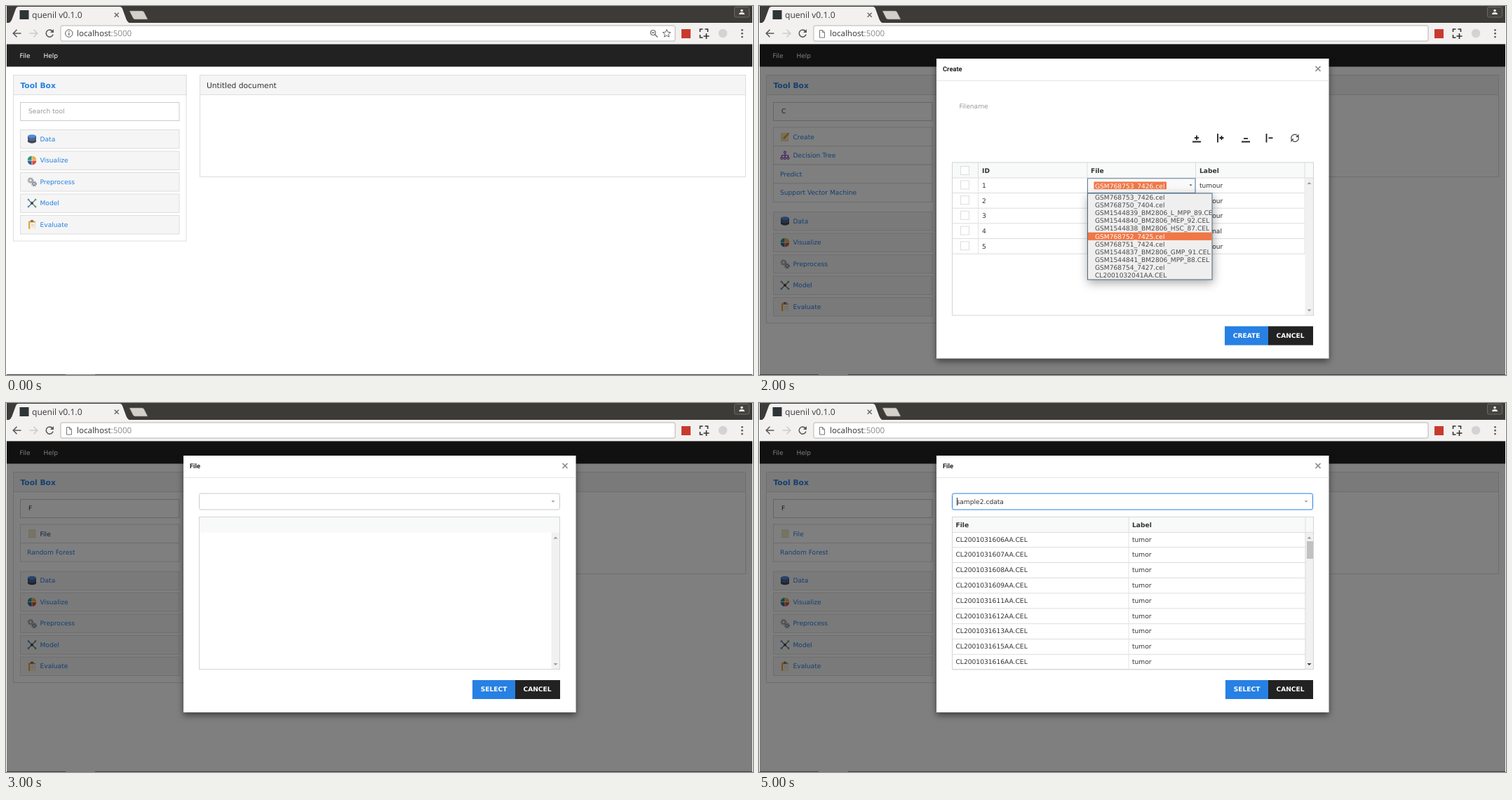
Write an HTML page that moves like this. It is 1065 px wide and 526 px high and loops after 6 s.

```html
<!DOCTYPE html>
<html lang="en">
<head>
<meta charset="utf-8">
<title>Tool box demo</title>
<style>
  html, body { margin: 0; width: 100%; height: 100%; overflow: hidden; background: #fff; }
  svg { display: block; width: 100%; height: 100%; }
  text { font-family: "DejaVu Sans", sans-serif; text-rendering: geometricPrecision; white-space: pre; }
  .chrome { font-family: "Open Sans", sans-serif; }
  .title { font-family: Roboto, sans-serif; }
  .modal { filter: drop-shadow(0 4px 5px rgba(0, 0, 0, .5)); }
  .menu { filter: drop-shadow(1px 4px 7px rgba(0, 0, 0, .35)); }
</style>
</head>
<body>
<svg id="stage" viewBox="0 0 1065 526"></svg>
<script>
const BLUE = '#2780e3', DARK = '#222', TEXT = '#333', LINE = '#ddd', ORANGE = '#f07746', CHROME = '#f2f1f0';
const SIZE = 9.15;

// Drawing helpers; text is placed by its left edge and the middle of its capitals.
const rect = (x, y, w, h, fill, stroke = 'none', more = '') =>
  `<rect x="${x}" y="${y}" width="${w}" height="${h}" fill="${fill}" stroke="${stroke}" ${more}/>`;
const path = (d, fill, stroke = 'none', w = 1) =>
  `<path d="${d}" fill="${fill}" stroke="${stroke}" stroke-width="${w}"/>`;
const line = (d, stroke = LINE, w = 1) => path(d, 'none', stroke, w);
const disc = (x, y, r, fill, stroke = 'none', more = '') =>
  `<circle cx="${x}" cy="${y}" r="${r}" fill="${fill}" stroke="${stroke}" ${more}/>`;
const text = (x, y, str, fill = TEXT, size = SIZE, more = '') =>
  `<text x="${x}" y="${y + size * .365}" font-size="${size}" fill="${fill}" ${more}>${str}</text>`;
const bold = (x, y, str, fill = TEXT, size = SIZE) => text(x, y, str, fill, size, 'font-weight="700"');
const tri = (x, y, up, w = 3, fill = '#999') =>
  path(`M${x - w} ${y + (up ? 1.5 : -1.5)}h${2 * w}l${-w} ${up ? -w : w}z`, fill);
const each = (list, draw) => list.map(draw).join('');

// Icons, drawn around (0, 0)
const pie = each(['#e3ad4a', '#d94b3f', '#3d5f96', '#33907a'], (c, i) =>
  `<path d="M.4 -.4V-6.3A6 6 0 0 1 6.3 -.4z" fill="${c}" transform="rotate(${i * 90})"/>`);
const gear = (x, y, r, c) => disc(x, y, r, 'none', c, 'stroke-width="1.8"') +
  disc(x, y, r + 1.4, 'none', c, 'stroke-width="1.4" stroke-dasharray="1.4 1.3"');
const corners = [[-5, -5], [5, -5], [-5, 5], [5, 5]];
const icons = {
  Data: path('M-6 -4V4.2Q0 8 6 4.2V-4z', '#3c4660') + path('M-6 -1V1Q0 5 6 1V-1z', '#56657f') +
    '<ellipse cy="-3.8" rx="6" ry="2.6" fill="#4d8be0"/>',
  Visualize: pie,
  Preprocess: gear(-2, -2, 2.4, '#a3a3a3') + gear(3, 3, 1.9, '#8690ab'),
  Model: line('M-5 -5L5 5M5 -5L-5 5', '#4f5b66', 1.2) + disc(0, 0, 2, '#3b4a5a') +
    each(corners, ([x, y], i) => disc(x, y, 1.4, i % 2 ? '#47a36b' : '#4a90c8')),
  Evaluate: rect(-5, -5, 10, 11.5, '#e8a33d', 'none', 'rx="1"') + rect(-2.8, -3, 7.5, 9.5, '#f6f2e6') +
    rect(-2, -6.5, 4, 3, '#777') + line('M-1 0h4M-1 2.5h4', '#bbb', .7),
  Create: rect(-5.5, -5, 10, 11, '#f3e6b0', '#d8c98a', 'stroke-width=".6"') +
    line('M-3.5 -1h6M-3.5 2h5', '#c9bd90', .7) + line('M-2 3L5.5 -5', '#e0902e', 2),
  'Decision Tree': line('M0 -3V0M-4.5 3V0H4.5V3M0 0V3', '#8a4fc0', 1.2) +
    each([[0, -4.3], [-4.5, 4], [0, 4], [4.5, 4]], ([x, y]) => disc(x, y, 1.5, 'none', '#8a4fc0', 'stroke-width="1.2"')),
  File: rect(-4.5, -5.5, 9.5, 11, '#efe9cc', '#d9d2b0', 'stroke-width=".6"'),
};
const icon = (name, x, y) => `<g transform="translate(${x} ${y})">${icons[name]}</g>`;

function browser(start) {
  const info = disc(89.8, 39, 5.2, 'none', '#5a5a5a') + line('M89.8 38v4M89.8 35.8v1.2', '#5a5a5a', 1.2);
  const page = line('M86.5 34.5h4l3 3v7.500h-7zM90.500 34.500v3h3', '#777');
  const extras = disc(922.5, 38, 3.5, 'none', '#666', 'stroke-width="1.2"') +
    line('M925 40.500l4 4M920.800 38h3.400', '#666', 1.3) +
    path('M942 33.500l1.600 3.700 4 .3-3 2.700.9 3.900-3.500-2.100-3.500 2.100.9-3.900-3-2.700 4-.3z', 'none', '#666');
  return rect(1, 0, 1063, 24, '#3c3b37') +
    path('M4 24.500Q7 23 8.500 19L14 4Q15 1 18 1H162Q165 1 166 4L171.500 19Q173 23 176 24.500z', CHROME) +
    rect(1, 24, 1063, 31, CHROME) +
    rect(19.500, 6, 13, 13, '#2f3436') +
    text(37, 12.800, 'quenil v0.1.0', '#3a3a3a', 12.1, 'class="chrome"') +
    line('M154.700 9.700l6 6M160.700 9.700l-6 6', '#666', 1.4) +
    path('M176 7H194Q196 7 197 9L202 19H184Q182 19 181 17z', '#d3d0ca', '#77756f', .6) +
    rect(1038.500, 1.500, 21, 14.500, '#45443f', '#6a6963', 'rx="2"') +
    disc(1049, 6.500, 1.800, '#eee') + path('M1045 12Q1045 9 1049 9T1053 12z', '#eee') +
    line('M21.500 39H10.500M15.500 33.800L10.300 39l5.200 5.200', '#5a5a5a', 1.6) +
    line('M33.500 39H44.500M39.500 33.800L44.700 39l-5.200 5.200', '#ccc', 1.6) +
    line('M66.500 36.500A5 5 0 1 0 67 40.500', '#5a5a5a', 1.6) + path('M68 33v5h-5z', '#5a5a5a') +
    rect(78, 28, 876, 22, '#fff', '#b7b5b2', 'rx="2"') +
    (start ? info + extras : page) +
    text(101, 39.200, 'localhost<tspan fill="#8a8a8a">:5000</tspan>', '#333', 11.6, 'class="chrome"') +
    rect(963, 33, 13, 13, '#c93a2e') +
    line('M989.500 37v-4h4M996.500 33h4v4M989.500 41v4h4M998.500 39v8M994.500 43h8', '#333', 1.6) +
    disc(1022, 39, 6.200, '#d3d3d3') +
    each([34.3, 39.2, 44.1], y => disc(1049.5, y, 1.4, '#5a5a5a'));
}

function workspace(query, results, hovered) {
  const shift = query ? results.length * 26.7 + 10.2 : 0;
  return rect(1, 54.500, 1063, 32, DARK) +
    text(19.500, 70.300, 'File', '#fff', 9) + text(53.500, 70.300, 'Help', '#fff', 9) +
    rect(10.500, 98.500, 246.500, 236.500 + shift, '#fff', LINE) +
    rect(10.500, 98.500, 246.500, 28, '#f5f5f5', LINE) +
    bold(20.500, 112.700, 'Tool Box', BLUE, 10.7) +
    rect(20.500, 137.500, 226.500, 26, '#fff', '#ccc') +
    text(32, 150, query || 'Search tool', query ? TEXT : '#999') +
    each(results, (name, i) => {
      const y = 186.300 + i * 26.600;
      return rect(20.500, y - 13.300, 226.500, 26.600, '#fff', LINE) +
        (icons[name] ? icon(name, 37, y) : '') +
        text(icons[name] ? 48.500 : 30, y, name, name === hovered ? '#123f78' : BLUE);
    }) +
    each(['Data', 'Visualize', 'Preprocess', 'Model', 'Evaluate'], (name, i) => {
      const y = 189.200 + i * 30.500 + shift;
      return rect(20.500, y - 12.700, 226.500, 26.500, '#f5f5f5', LINE) +
        icon(name, 37, y + .4) + text(48.500, y, name, BLUE);
    }) +
    rect(276.500, 98.500, 778, 145, '#fff', LINE) + rect(276.500, 98.500, 778, 28, '#f5f5f5', LINE) +
    text(286, 112.700, 'Untitled document', TEXT, 10.7);
}

function modal(title, bottom, action) {
  const y = bottom - 46, x = action === 'CREATE' ? 664 : 665;
  return rect(1, 54.500, 1063, 471, '#000', 'none', 'opacity=".5"') +
    rect(253, 75, 559.500, bottom - 75, '#fff', 'none', 'class="modal"') +
    text(262, 90, title, '#222', 9.3, 'class="title" font-weight="700"') +
    line('M793.500 86l7 7M800.500 86l-7 7', '#8a8a8a', 1.7) +
    line('M253 106.500H812.500', '#e5e5e5') +
    rect(x, y, 726 - x, 27, BLUE) + rect(726, y, 64, 27, DARK) +
    bold(x + 11.800, y + 13, action, '#fff', 9.1) + bold(737.500, y + 13, 'CANCEL', '#fff', 9.1);
}

const checkbox = y => rect(287.500, y - 6, 12, 12, '#fff', LINE);

function grid(x2, top, bottom, columns) {
  return rect(275.500, top, x2 - 275.500, bottom - top, '#fff') +
    rect(275.500, top, x2 - 275.500, 22, '#f8f9f9') +
    rect(x2 - 12, top + 22, 12, bottom - top - 22, '#f1f1f1') +
    (columns.length ? line(`M275.500 ${top + 22}H${x2}`) : '') +
    each(columns, x => line(`M${x} ${top}v22`)) +
    rect(275.500, top, x2 - 275.500, bottom - top, 'none', '#d4d4d4') +
    tri(x2 - 6, top + 29.500, true) + tri(x2 - 6, bottom - 7, false);
}

function createDialog() {
  return modal('Create', 502.500, 'CREATE') + text(285.500, 142.500, 'Filename', '#999') +
    line('M618 193.500h12M624 184.500v6.500M620.800 187.800h6.400M654 182v12.500M656.500 188h6M659.500 185v6' +
      'M688 193.500h12M691 188.800h6M723.500 182v12.500M726.500 188.200h6', '#222', 1.8) +
    line('M759 189.500A5 5 0 0 1 767 184.300M769 187A5 5 0 0 1 761 192.200', '#444', 1.2) +
    path('M769.500 182.500v4.500h-4.500zM758.500 194v-4.500h4.500z', '#444') +
    grid(790.500, 223, 441, [312.500, 468, 622.500, 778]) + checkbox(234.500) +
    bold(318, 234.500, 'ID') + bold(473, 234.500, 'File') + bold(628, 234.500, 'Label');
}

function fileMenu() {
  const files = ['GSM768753_7426.cel', 'GSM768750_7404.cel', 'GSM1544839_BM2806_L_MPP_89.CEL',
    'GSM1544840_BM2806_MEP_92.CEL', 'GSM1544838_BM2806_HSC_87.CEL', 'GSM768752_7425.cel',
    'GSM768751_7424.cel', 'GSM1544837_BM2806_GMP_91.CEL', 'GSM1544841_BM2806_MPP_88.CEL',
    'GSM768754_7427.cel', 'CL2001032041AA.CEL'];
  const rows = each(['tumour', 'tumour', 'tumour', 'normal', 'tumour'], (label, i) => {
    const y = 255.500 + i * 21.700;
    return checkbox(y - .500) + text(318, y, i + 1) + text(628, y, label) +
      line(`M275.500 ${y + 11}H778`) +
      each([312.500, 468, 622.500, 778], x => line(`M${x} ${y - 10.700}v21.700`, '#e4e4e4'));
  });
  return rows + rect(468.500, 245.800, 153.500, 20.700, '#fafafa', '#5c7f9e') +
    rect(477.500, 250.500, 103.500, 10.700, ORANGE) + text(479, 256.300, files[0], '#fff') + tri(615.500, 256, false, 2, '#444') +
    rect(468.500, 267, 177.500, 123, '#efefef', '#4d6a80', 'class="menu"') +
    rect(469, 322.700, 176.500, 11.200, ORANGE) +
    '<clipPath id="edge"><path d="M469 267h176.500v123h-176.500z"/></clipPath><g clip-path="url(#edge)">' +
    each(files, (name, i) => text(479, 272.800 + i * 11.080, name, i === 5 ? '#fff' : '#4a4a4a')) + '</g>';
}

const picker = (border, up) => rect(275.500, 129, 514, 23, '#fff', border, 'rx="2.500"') + tri(780, 140.800, up, 2.500);
const caret = line('M282.500 135v11', '#222');
const fileDialog = columns => modal('File', 441, 'SELECT') + grid(columns.length ? 790.500 : 789.500, 162.500, 379.500, columns);

const options = rect(275.500, 152, 514, 47.500, '#fff', '#ccc') + rect(276, 176, 513, 23.500, '#ebf5ff') +
  text(281.500, 164, 'sample2.cdata', '#666') + text(281.500, 187.300, 'sample1.cdata');

const samples = bold(280.500, 174, 'File') + bold(532, 174, 'Label') +
  each(['06', '07', '08', '09', '11', '12', '13', '15', '16'], (id, i) => {
    const y = 194.200 + i * 21.800;
    return text(280.500, y, `CL20010316${id}AA.CEL`) + text(532, y, 'tumor') +
      line(`M275.500 ${y + 11.500}H779`) + line(`M527 ${y - 10}v21.500`, '#e4e4e4');
  }) + line('M779 184V379.500') + rect(781, 197, 9, 25, '#c1c1c1') + tri(784.500, 372.500, false, 3, '#444');

const footer = rect(1, 525, 1063, 1, '#3d3d3d') + rect(85, 525, 42, 1, '#777');
const withC = browser() + workspace('C', ['Create', 'Decision Tree', 'Predict', 'Support Vector Machine']) + createDialog();
const withF = hovered => browser() + workspace('F', ['File', 'Random Forest'], hovered);

const scenes = [
  browser(true) + workspace('', []),
  withC,
  withC + fileMenu(),
  withF('File') + fileDialog([]) + picker('#ccc', false),
  withF() + fileDialog([]) + picker('#bbb', true) + options + caret,
  withF() + fileDialog([527, 779]) + picker(BLUE, false) + text(281.500, 140.300, 'sample2.cdata') + caret,
].map(scene => scene + footer);
scenes[5] += samples;

const stage = document.getElementById('stage');
let shown = -1;
function tick() {
  const now = Math.floor(performance.now() % 6000 / 1000);
  if (now !== shown) stage.innerHTML = scenes[shown = now];
  requestAnimationFrame(tick);
}
tick();
</script>
</body>
</html>
```
